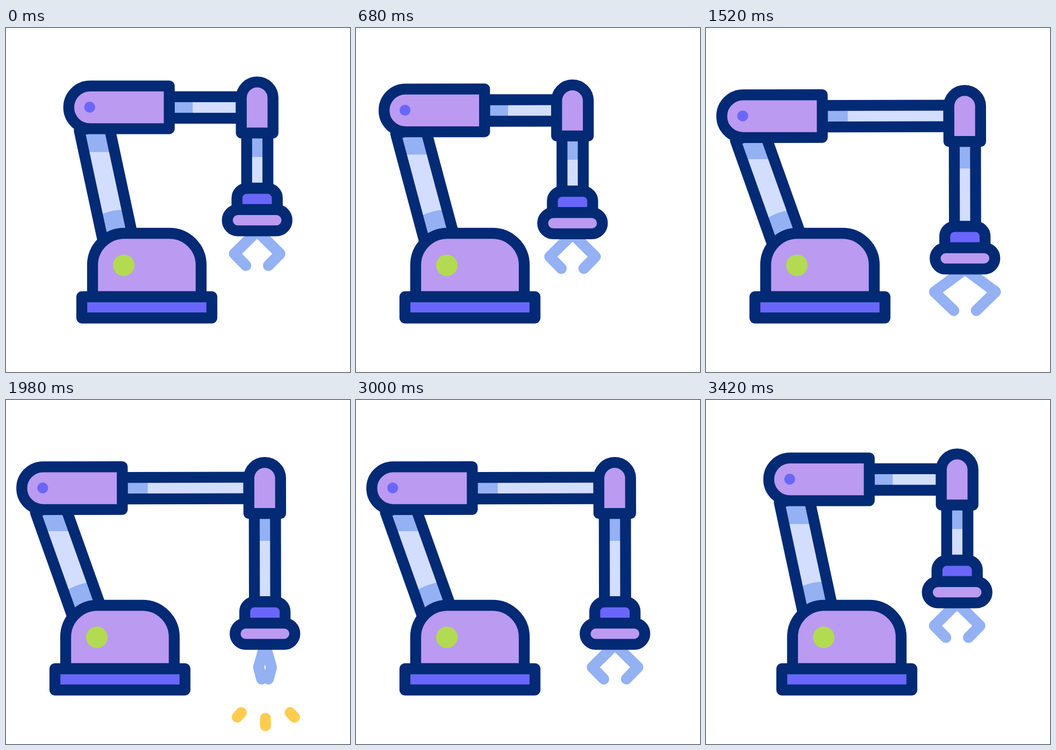
Write an HTML page with a canvas that moves like this. It is 640 px wide and 640 px high and loops after 3600 ms.

```html
<!DOCTYPE html>
<html lang="en">
<head>
<meta charset="utf-8">
<title>Robot arm</title>
<style>
html, body { margin: 0; width: 100%; height: 100%; overflow: hidden; background: #fff; }
canvas { display: block; }
</style>
</head>
<body>
<canvas id="stage" width="640" height="640"></canvas>
<script>
const ctx = document.getElementById('stage').getContext('2d');
const LOOP = 3600;
const NAVY = '#032a75', LILAC = '#bb9af1', VIOLET = '#6a66fa', PALE = '#d3ddfd',
      BLUE = '#93b1f3', GREEN = '#b2db52', YELLOW = '#ffcc4f';
const rad = deg => deg * Math.PI / 180;

// Eased value at time t through a flat list of time, value pairs.
function tween(t, ...keys) {
  for (let i = 2; i < keys.length; i += 2) {
    if (t < keys[i]) {
      const p = Math.max(0, (t - keys[i - 2]) / (keys[i] - keys[i - 2]));
      return keys[i - 1] + (keys[i + 1] - keys[i - 1]) * p * p * (3 - 2 * p);
    }
  }
  return keys[keys.length - 1];
}

function box(x, y, w, h, r = 0) {
  const path = new Path2D();
  path.roundRect(x, y, w, h, r);
  return path;
}

function fillOutlined(path, fill) {
  ctx.fillStyle = fill;
  ctx.fill(path);
  outline(path);
}

function outline(path, color = NAVY) {
  ctx.strokeStyle = color;
  ctx.stroke(path);
}

function dot(x, y, r, color) {
  ctx.fillStyle = color;
  ctx.beginPath();
  ctx.arc(x, y, r, 0, 7);
  ctx.fill();
}

function line(x1, y1, x2, y2, color) {
  outline(new Path2D(`M${x1} ${y1}L${x2} ${y2}`), color);
}

function lowerArm(jx, jy, angle, tilt, baseX) {
  const arm = box(-28, 38, 56, 262);
  const slope = Math.tan(rad(angle + tilt)) * 28;
  ctx.save();
  ctx.translate(jx, jy);
  ctx.rotate(-rad(angle));
  ctx.save();
  ctx.clip(arm);
  ctx.fillStyle = PALE;
  ctx.fill(arm);
  ctx.fillStyle = BLUE;
  ctx.fill(new Path2D(`M-28 0H28V${85 + slope}L-28 ${85 - slope}Z`));
  ctx.rotate(rad(angle));
  ctx.translate(-jx, -jy);
  dot(219 + baseX, 441, 103, BLUE);
  ctx.restore();
  outline(arm);
  ctx.restore();
}

function base(x) {
  ctx.save();
  ctx.translate(x, 0);
  fillOutlined(box(161, 382, 202, 118, [59, 59, 0, 0]), LILAC);
  fillOutlined(box(141, 500, 242, 39.5), VIOLET);
  dot(219, 441.5, 20, GREEN);
  ctx.restore();
}

function claws(elbow, tipX, tipY) {
  for (const side of [-1, 1]) {
    outline(new Path2D(`M467.5 378L${467.5 + side * elbow} 420L${467.5 + side * tipX} ${358 + tipY}`), BLUE);
  }
}

function upperArm(t, jx, jy, turn) {
  const reach = tween(t, 800, 0, 1200, 101.5, 3000, 101.5, 3400, 0);
  const drop = tween(t, 1200, 0, 1600, 61.5, 3000, 61.5, 3400, 0);
  const claw = (rest, open, shut) =>
    tween(t, 1200, rest, 1400, open, 1720, shut, 2600, shut, 3000, rest);

  ctx.save();
  ctx.translate(jx, jy);
  ctx.rotate(rad(turn));
  ctx.translate(-156, -147.7);

  const rod = box(304, 128, 134 + reach, 40);
  ctx.fillStyle = BLUE;
  ctx.fill(box(304, 128, 44 + reach * 0.035, 40));
  ctx.fillStyle = PALE;
  ctx.fill(box(348 + reach * 0.035, 128, 90 + reach * 0.965, 40));
  outline(rod);
  fillOutlined(box(117, 108, 187, 79.5, [39.7, 0, 0, 39.7]), LILAC);
  dot(156, 147.3, 10.2, VIOLET);

  ctx.translate(reach, 0);
  const shade = 240 + drop * 0.11;
  ctx.fillStyle = BLUE;
  ctx.fill(box(448, 195, 39.5, shade - 195));
  ctx.fillStyle = PALE;
  ctx.fill(box(448, shade, 39.5, 298 + drop - shade));
  outline(box(448, 195, 39.5, 103 + drop));
  fillOutlined(box(438, 100.5, 59, 95, [29.5, 29.5, 0, 0]), LILAC);

  ctx.translate(0, drop);
  claws(claw(42.5, 78, 12), claw(21, 27.7, 6.3), claw(84, 103, 84));
  fillOutlined(box(430, 298.5, 75, 39.5, [18, 18, 0, 0]), VIOLET);
  fillOutlined(box(412, 338, 111, 39.5, 19.7), LILAC);
  ctx.restore();
}

// Two bursts; each streak grows outwards, then its tail catches up.
function sparks(t) {
  if (t <= 1600 || t >= 2600) return;
  const phase = (t - 1600) % 500;
  const head = tween(phase, 0, 0, 250, 1);
  const tail = tween(phase, 250, 0, 500, 1);
  if (head - tail < 0.002) return;
  const streak = (x, y, dx, dy) =>
    line(x + dx * tail, y + dy * tail, x + dx * head, y + dy * head, YELLOW);
  streak(446.5, 571.5, -16.3, 18.5);
  streak(482.7, 576, 0, 30);
  streak(519, 571.5, 17.7, 18.7);
}

function draw(t) {
  const baseX = tween(t, 0, 0, 400, -50, 3000, -50, 3400, 0);
  const swing = tween(t, 0, 0, 400, -14.3, 800, 7.5, 3000, 7.5, 3400, 0);
  const angle = rad(19.9 + swing);
  const jx = 262 + baseX - 312.2 * Math.sin(angle);
  const jy = 441.2 - 312.2 * Math.cos(angle);
  const turn = swing < 0 ? swing * 0.045 : -swing * 0.013;

  ctx.fillStyle = '#fff';
  ctx.fillRect(0, 0, 640, 640);
  ctx.lineWidth = 20.3;
  ctx.lineJoin = ctx.lineCap = 'round';
  lowerArm(jx, jy, 12.1 + swing, Math.max(0, -swing) / 3, baseX);
  base(baseX);
  upperArm(t, jx, jy, turn);
  sparks(t);
}

const start = performance.now();
function tick() {
  draw((performance.now() - start) % LOOP);
  requestAnimationFrame(tick);
}
tick();
</script>
</body>
</html>
```
